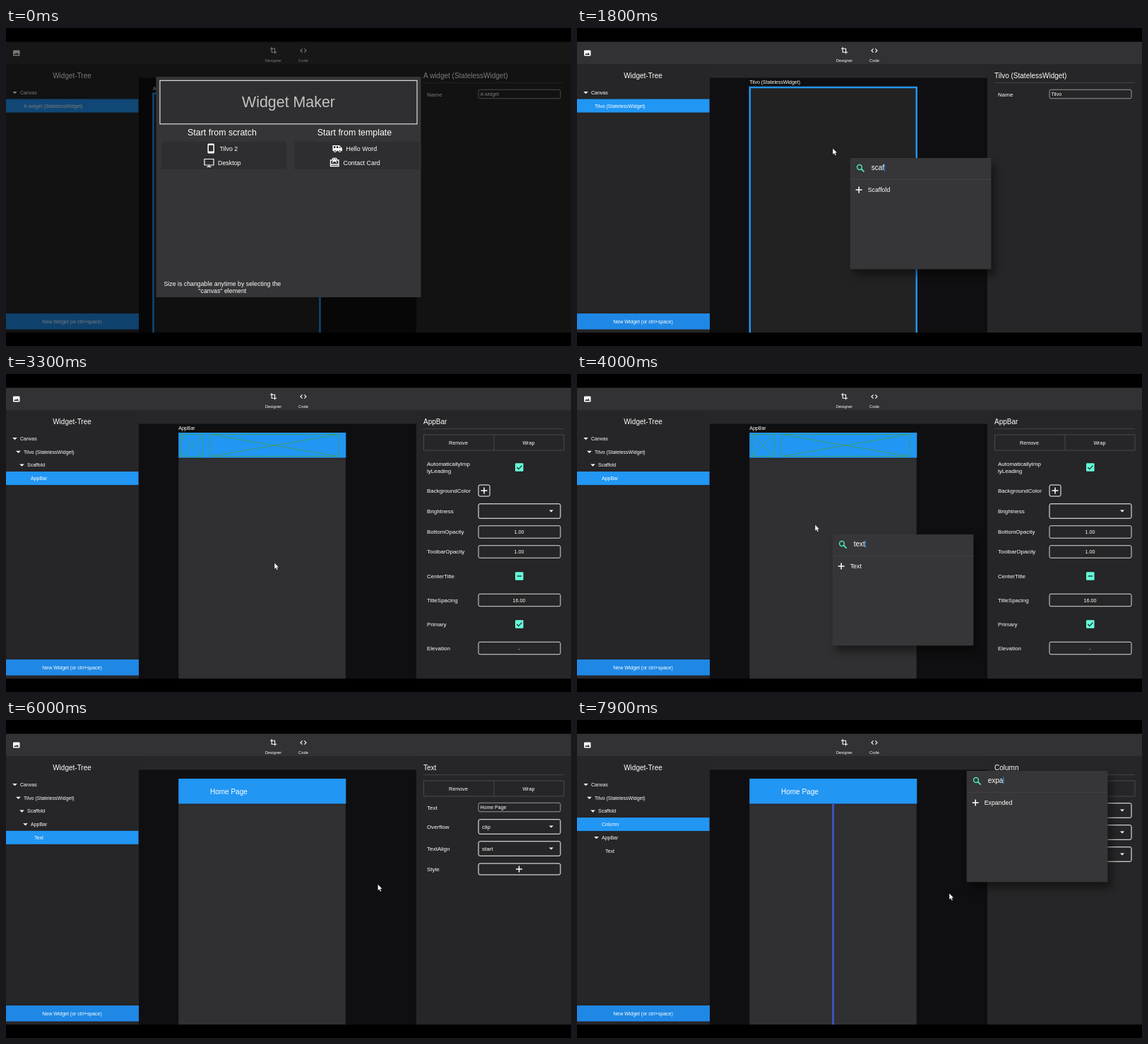
These frames come from a looping animation (800x450 px, 8 s). An HTML page:

```html
<!DOCTYPE html>
<html lang="en">
<head>
<meta charset="utf-8">
<title>Widget Maker</title>
<style>
html, body { margin: 0; width: 100%; height: 100%; overflow: hidden; background: #000; }
svg { display: block; width: 800px; height: 450px; font-family: "Liberation Sans", Arial, sans-serif; }
text { white-space: pre; }
</style>
</head>
<body>
<svg id="stage" viewBox="0 0 800 450"></svg>
<script>
const stage = document.getElementById('stage');
const pen = document.createElement('canvas').getContext('2d');
const LOOP = 8000, STEP = 100;
const BLUE = '#2196f3', TEAL = '#64ffda', PANEL = '#262527', GREEN = '#4caf50';

// Drawing helpers; text is placed by its vertical centre.
const text = (x, y, s, size = 7, fill = '#fff', anchor = 'start') =>
  `<text x="${x}" y="${y + size * 0.36}" font-size="${size}" fill="${fill}" text-anchor="${anchor}">${s}</text>`;
const centred = (x, y, s, size, fill) => text(x, y, s, size, fill, 'middle');
const rect = (x, y, w, h, fill, extra = '') =>
  `<rect x="${x}" y="${y}" width="${w}" height="${h}" fill="${fill}" ${extra}/>`;
const path = (d, stroke, width = 1, extra = '') =>
  `<path d="${d}" fill="none" stroke="${stroke}" stroke-width="${width}" ${extra}/>`;
const shape = (d, fill) => `<path d="${d}" fill="${fill}" fill-rule="evenodd"/>`;
const group = (x, y, body) => `<g transform="translate(${x} ${y})">${body}</g>`;
const plus = (x, y) => path(`M${x - 4.5} ${y}h9M${x} ${y - 4.5}v9`, '#fff', 1.5);
const caret = (x, y, w = 3.5) => shape(`M${x - w} ${y - w / 2}h${2 * w}l${-w} ${w}z`, '#fff');
const crossed = (x, y, w, h, stroke, width) =>
  path(`M${x} ${y}h${w}v${h}h${-w}zL${x + w} ${y + h}M${x + w} ${y}L${x} ${y + h}`, stroke, width);

// Timeline
const selections = [
  [0, 'A widget'], [500, 'Tilvo'], [1900, 'Scaffold'], [3300, 'AppBar'],
  [4300, 'Text'], [6100, null], [7200, 'Column']
];
const searches = [
  { open: 1400, close: 1900, word: 'scaffold', type: 1500 },
  { open: 2400, close: 3300, word: 'appbar', type: 2700 },
  { open: 3600, close: 4300, word: 'text', type: 3700 },
  { open: 6300, close: 7200, word: 'column', type: 6500 },
  { open: 7500, close: 8000, word: 'expanded', type: 7600 }
];
const pointer = [
  [100, 400, 290], [400, 316, 172], [500, 316, 172], [900, 349, 177], [1000, 349, 177],
  [1300, 385, 168], [1400, 362, 170], [1900, 362, 170], [2400, 380, 267], [3300, 380, 267],
  [3600, 337, 213], [4300, 337, 213], [4800, 701, 126], [5700, 701, 126],
  [6100, 494, 252], [7200, 494, 252], [7500, 527, 245], [8000, 527, 245]
];
const catalog = ['Text', 'AppBar', 'CupertinoNavigationBar', 'Icon', 'Image', 'SizedBox',
  'Scaffold', 'Column', 'Expanded'];

const clamp = v => Math.max(0, Math.min(1, v));
const ease = v => v * v * (3 - 2 * v);
const progress = (t, from, to) => ease(clamp((t - from) / (to - from)));
const selectedAt = t => selections.filter(([start]) => start <= t).pop()[1];
const typed = (word, t, start, pace = 100) =>
  word.slice(0, Math.max(0, Math.floor((t - start) / pace) + 1));

function pointerAt(t) {
  const i = Math.max(1, pointer.findIndex(p => p[0] > t));
  const [t0, x0, y0] = pointer[i - 1], [t1, x1, y1] = pointer[i];
  const k = progress(t, t0, t1);
  return { x: x0 + (x1 - x0) * k, y: y0 + (y1 - y0) * k };
}

function chrome(sel) {
  return rect(0, 19.5, 800, 32, '#323133') + rect(0, 51, 188, 380, PANEL) +
    rect(581, 51, 219, 380, PANEL) + rect(188, 51, 393, 20, '#272628') +
    rect(188, 70.5, 393, 360.5, '#0f0f11') +
    shape('M11 31.5h7.5q1 0 1 1v6q0 1-1 1h-7.5q-1 0-1-1v-6q0-1 1-1zM11.2 38h7l-2.3-3.2-1.8 2.2-1.2-1.5z', '#fff') +
    path('M376.2 27v7.3h7.2M374 29.2h6.6v7.3', '#fff', 1.1) +
    path('M419.6 29.3l-2.6 2.7 2.6 2.7M422.4 29.3l2.6 2.7-2.6 2.7', '#fff', 1.1) +
    centred(378.5, 46, 'Designer', 5.8) + centred(421, 46, 'Code', 5.8) +
    centred(93.5, 67, 'Widget-Tree', 10) +
    rect(0, 404, 188, 22.5, '#1f88e5') + centred(93.5, 415, 'New Widget (or ctrl+space)') +
    (sel ? '' : text(192.5, 61, 'New Canvas'));
}

function tree(sel) {
  if (!sel) return '';
  const root = sel === 'A widget' ? sel : 'Tilvo';
  const rows = [['Canvas', 0], [root, 1]];
  if (sel !== root) rows.push(['Scaffold', 2]);
  if (sel === 'Column') rows.push(['Column', 3]);
  if (['AppBar', 'Text', 'Column'].includes(sel)) rows.push(['AppBar', 3]);
  if (['Text', 'Column'].includes(sel)) rows.push(['Text', 4]);
  return rows.map(([name, depth], i) => {
    const y = 91.3 + i * 18.75, x = 20 + depth * 5;
    const isParent = rows[i + 1] && rows[i + 1][1] > depth;
    return (name === sel ? rect(0, y - 9.5, 187.5, 19, BLUE) : '') +
      (isParent ? caret(x - 7.5, y + 0.3, 3.3) : '') +
      text(x, y, name === root ? `${name} (StatelessWidget)` : name);
  }).join('');
}

// Property rows
const label = (y, s) => text(596, y, s, 8);
const box = (y, h, stroke = '#ddd', w = 116) =>
  rect(669, y - h / 2, w, h, 'none', `rx="2" stroke="${stroke}" stroke-width="1"`);
const field = (y, name, value) => label(y, name) + box(y - 0.5, 12.5, '#999') + text(671.5, y - 0.8, value);
const dropdown = (y, name, value = '') =>
  label(y, name) + box(y, 20.5, '#fff') + text(674, y, value, 8) + caret(772, y, 3);
const number = (y, name, value) => label(y, name) + box(y, 17.5) + centred(726.5, y, value, 7.2);
const check = (y, name, mark) => label(y, name) + rect(721, y - 5.8, 11.5, 11.5, TEAL, 'rx="1"') +
  path(mark ? `M723.3 ${y}l2.5 2.6 4.6-5` : `M723.5 ${y}h6.5`, PANEL, 1.3);
const color = y => label(y, 'BackgroundColor') + box(y, 16, '#fff', 16) + plus(677, y);

const properties = {
  Scaffold: () => color(125),
  AppBar: () => check(132, '', true) + label(127.5, 'AutomaticallyImp') + label(137, 'lyLeading') +
    color(165) + dropdown(194, 'Brightness') + number(223.5, 'BottomOpacity', '1.00') +
    number(251.5, 'ToolbarOpacity', '1.00') + check(286, 'CenterTitle', false) +
    number(320, 'TitleSpacing', '16.00') + check(354, 'Primary', true) + number(388, 'Elevation', '-'),
  Text: value => field(124, 'Text', value) + dropdown(151, 'Overflow', 'clip') +
    dropdown(182, 'TextAlign', 'start') + label(211, 'Style') + box(211, 16, '#fff') + plus(726.5, 211),
  Column: () => dropdown(128, 'MainAxisAlign', 'start') + dropdown(159, 'MainAxisSize', 'max') +
    dropdown(190, 'CrossAxisAlign', 'center')
};

function inspector(sel, value) {
  if (!sel) return text(591, 67, 'Property Editor', 10) + centred(690.5, 246, 'Select a widget', 7.2);
  const isRoot = !properties[sel];
  return text(591, 67, isRoot ? `${sel} (StatelessWidget)` : sel, 10) +
    path('M591 77.5h199', '#414042') +
    (isRoot ? field(94, 'Name', sel)
      : path('M591.5 86h198.5v22h-198.5zM691 86v22', '#4a494b') +
        centred(640.5, 97, 'Remove', 7.2) + centred(740, 97, 'Wrap', 7.2) + properties[sel](value));
}

function preview(t, sel, value) {
  const pan = progress(t, 1000, 1300);
  const x = 208 + 36.3 * pan, y = 92.3 - 8.8 * pan, w = 236.5;
  const border = path(`M${x + 0.5} 440V${y + 0.5}h${w - 0.5}V440`, BLUE, 2.5);
  const title = s => text(x, y - 7, s);
  if (t < 1900) return rect(x, y, w, 360, '#222223') + border + title(`${sel} (StatelessWidget)`);
  let out = rect(x, y, w, 360, '#302f31');
  if (sel === 'Scaffold')
    return out + border + crossed(x + 1, y + 1, w - 2, 34, GREEN, 1.3) +
      crossed(x + 1, y + 35, w - 2, 401, GREEN, 1.3) +
      path(`M${x + 0.5} 440V${y + 0.5}h${w - 0.5}V440`, BLUE, 2.5) + title(sel);
  out += rect(x, y + 35, w, 2, '#29282a') + rect(x, y - 0.5, w + 0.5, 35.5, BLUE);
  if (sel === 'AppBar')
    return out + crossed(248, 85.5, 31, 31, '#3f9d60', 0.9) +
      crossed(289, 85.5, 182, 31, '#3f9d60', 0.9) + title(sel);
  if (sel === 'Column') out += rect(361, 118.5, 3.2, 320, '#3f51b5');
  return out + (t < 5000 ? text(289, 91, 'Text', 10) : '') + text(289, 101, value, 10);
}

function welcome(t) {
  const dim = 0.52 * (1 - progress(t, 400, 700));
  const shade = dim ? rect(0, 19, 800, 412, '#000', `opacity="${dim}"`) : '';
  if (t >= 500) return shade;
  const entry = (x, y, s) => text(x, y, s, 8.9);
  const desktop = path('M281 185.5h13v8.5h-13zM287.5 194v2.3M284.5 196.3h6', '#fff', 1.2);
  const phone = shape('M287 163.5h6.5q1.5 0 1.5 1.5v11q0 1.5-1.5 1.5h-6.5q-1.5 0-1.5-1.5v-11q0-1.5 1.5-1.5zM287 166v8.5h6.5v-8.5z', '#fff');
  const bus = shape('M462.5 166h9.5l4 4v4h-13.5zM464 167.3v2.7h2.5v-2.7zM468 167.3v2.7h2.5v-2.7zM472 167.5v2.5h2.3z', '#fff') +
    '<g fill="#2d2c2e" stroke="#fff"><circle cx="466" cy="174" r="1.5"/><circle cx="472.5" cy="174" r="1.5"/></g>';
  const gift = path('M459.5 187h11.5v8.5h-11.5zM459.5 193h11.5M462 190.5l3.2-3.5 3.2 3.5', '#fff', 1.3) +
    '<g fill="none" stroke="#fff" stroke-width="1.2"><circle cx="463.7" cy="185.6" r="1.4"/><circle cx="466.8" cy="185.6" r="1.4"/></g>';
  return shade + rect(212.5, 69, 375, 312, '#353436') +
    rect(218, 74.3, 364, 61.5, '#2f2e30', 'stroke="#fff"') +
    centred(400, 104.5, 'Widget Maker', 21.4, '#c4c4c4') +
    centred(306, 148, 'Start from scratch', 12.4) + centred(493.5, 148, 'Start from template', 12.4) +
    rect(220, 161, 177, 39, '#2e2d2f') + rect(408, 161, 177, 39, '#2e2d2f') +
    phone + desktop + bus + gift +
    entry(302.5, 170.5, 'Tilvo 2') + entry(300, 190.3, 'Desktop') +
    entry(481.5, 170.5, 'Hello Word') + entry(477.5, 190.3, 'Contact Card') +
    centred(306.3, 362, 'Size is changable anytime by selecting the', 8.8) +
    centred(306.3, 371.7, '"canvas" element', 8.8);
}

function searchBox(t) {
  const search = searches.find(s => t >= s.open && t < s.close);
  if (!search) return '';
  const at = pointerAt(search.open);
  const below = at.y + 172 < 410;
  const query = typed(search.word, t, search.type);
  const found = catalog.filter(name => name.toLowerCase().includes(query)).slice(0, 6);
  pen.font = '10px "Liberation Sans", Arial, sans-serif';
  const caretX = 30 + pen.measureText(query).width;
  return group(at.x + 24.7, at.y + (below ? 14 : -173),
    rect(0, 0, 199.7, 157.3, '#363537', 'style="filter:drop-shadow(5px 8px 6px rgba(0,0,0,.45))"') +
    path('M0 30.2h199.7', '#464547', 0.8) +
    '<circle cx="13.3" cy="13" r="3.4" fill="none" stroke="#4de2b8" stroke-width="1.5"/>' +
    path('M15.8 15.5l4.2 4.2', '#4de2b8', 1.8) +
    text(30, 13.7, query || 'Search for a widget...', query ? 10 : 9.8, query ? '#fff' : '#9c9c9c') +
    rect(caretX, 8.5, 1, 10.5, BLUE) +
    found.map((name, i) => plus(12.5, 45 + i * 20) + text(25, 45.3 + i * 20, name, 8.8)).join(''));
}

function cursor(t) {
  if (t < 100) return '';
  const { x, y } = pointerAt(t);
  return group(x, y, '<path d="M0 0v9.3l2.1-1.9 1.4 3.2 1.7-.8-1.4-3h2.8z" fill="#fff" stroke="#000" stroke-width=".5"/>');
}

function draw(t) {
  const sel = selectedAt(t);
  const value = t < 5000 ? 'Hello' : typed('Home Page', t, 5000, 80);
  stage.innerHTML = '<defs><clipPath id="view"><rect x="188" y="71" width="393" height="360"/></clipPath></defs>' +
    rect(0, 0, 800, 450, '#000') + chrome(sel) +
    `<g clip-path="url(#view)">${preview(t, sel, value)}</g>` +
    tree(sel) + inspector(sel, value) + welcome(t) + searchBox(t) + cursor(t);
}

let shown = -1;
const began = performance.now();
function tick() {
  const t = Math.floor(((performance.now() - began) % LOOP) / STEP) * STEP;
  if (t !== shown) draw(shown = t);
  requestAnimationFrame(tick);
}
tick();
</script>
</body>
</html>
```
